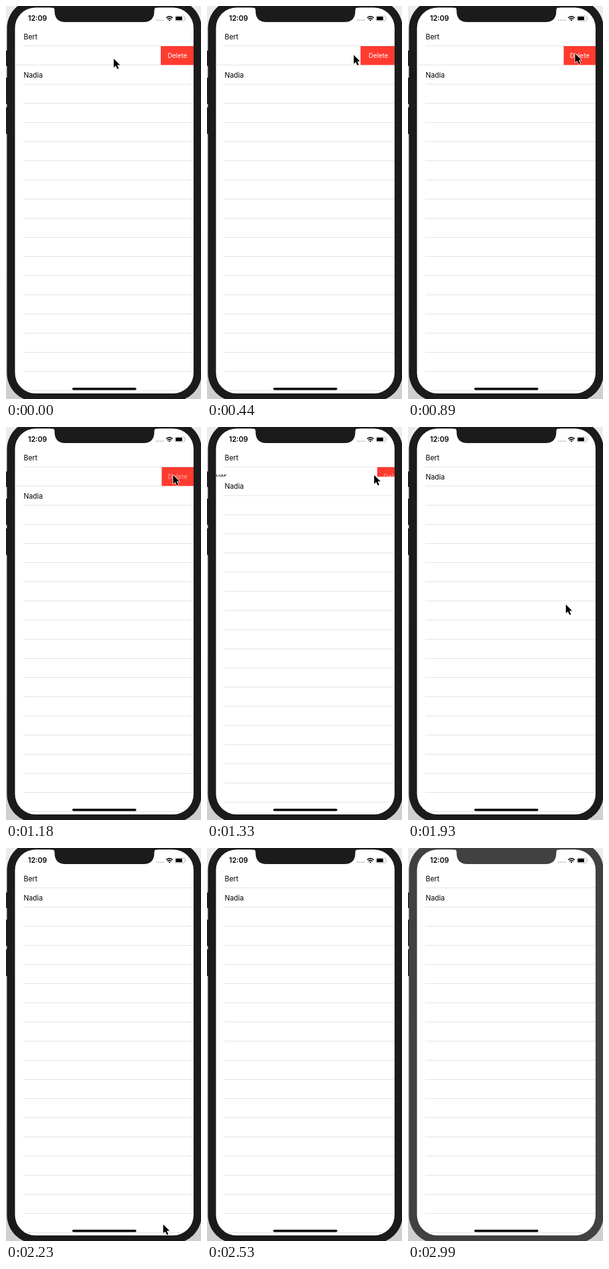
Recreate the animation shown at these times as an HTML page. Size 315 by 636 pixels, loop 3.09 s.

```html
<!DOCTYPE html>
<html lang="en">
<head>
<meta charset="utf-8">
<title>Swipe to delete</title>
<style>
  html, body { margin: 0; width: 100%; height: 100%; overflow: hidden; background: #e6e6e6; }
  svg { display: block; width: 100%; height: 100%; }
  text { font-family: Inter, Roboto, Arial, sans-serif; font-size: 11.3px; fill: #000; }
</style>
</head>
<body>
<svg viewBox="0 0 315 636">
  <defs>
    <linearGradient id="wall" x1="0" y1="0" x2="0" y2="1">
      <stop offset="0" stop-color="#ececec"/>
      <stop offset="1" stop-color="#cfcfcf"/>
    </linearGradient>
    <clipPath id="screen"><rect x="14.5" y="2.5" width="288.5" height="624.5" rx="33"/></clipPath>
    <clipPath id="rowClip"><rect id="rowBox" x="14" y="65" width="290" height="31"/></clipPath>
  </defs>

  <rect width="315" height="636" fill="url(#wall)"/>
  <g fill="#202020">
    <rect x="0" y="72" width="3" height="25"/>
    <rect x="0" y="116" width="3" height="42.5"/>
    <rect x="0" y="164" width="3" height="43"/>
  </g>
  <rect class="bezel" x="1.5" y="-10" width="314.5" height="650" rx="46"/>

  <g clip-path="url(#screen)">
    <rect x="14" y="2" width="290" height="626" fill="#fff"/>
    <text x="28.5" y="53.6">Bert</text>
    <rect x="28" y="64" width="275" height="1" fill="#e2e2e2"/>
    <g id="row" clip-path="url(#rowClip)">
      <g id="cell">
        <text x="28.5" y="84.4">Oliver</text>
        <rect x="28" y="95" width="275" height="1" fill="#e2e2e2"/>
      </g>
      <rect id="action" y="64.5" width="70" height="31" fill="#ff3b30"/>
      <text id="label" y="84" style="font-size:10.4px;fill:#fff">Delete</text>
    </g>
    <g id="rest">
      <text x="28.5" y="115.6">Nadia</text>
      <g id="lines" fill="#e2e2e2"></g>
    </g>
  </g>

  <path class="bezel" d="M72 0V2.5H74.5Q78.5 2.5 78.5 7V9Q79 26 96 26H222Q239 26 239.500 9V7Q239.500 2.500 243.500 2.500H246V0Z"/>

  <text x="35.600" y="24.200" style="font-size:11.500px;font-weight:600">12:09</text>
  <g fill="#c4c4c4">
    <circle cx="243.300" cy="23" r="1.200"/><circle cx="246.800" cy="23" r="1.200"/>
    <circle cx="250.300" cy="23" r="1.200"/><circle cx="253.800" cy="23" r="1.200"/>
  </g>
  <g fill="none" stroke="#000" stroke-width="1.700">
    <path d="M258.700 19.200Q264 14.400 269.300 19.200"/>
    <path d="M260.700 21.400Q264 18.500 267.300 21.400"/>
  </g>
  <path d="M262.300 22.700Q264 21.400 265.700 22.700L264 24.500Z"/>
  <rect x="273" y="16.200" width="16" height="8" rx="2.200" fill="none" stroke="#a5a5a5" stroke-width=".8"/>
  <rect x="274.200" y="17.300" width="10.400" height="5.800" rx="1.200"/>
  <path d="M290 18.700Q291.300 20.200 290 21.700Z" fill="#a5a5a5"/>

  <rect x="107" y="617.800" width="103.500" height="3.600" rx="1.800"/>

  <g id="cursor" stroke-linejoin="round">
    <path d="M1.500 2V16.500L4.700 13.500L7.300 19L10 17.800L7.500 12.500H12Z" opacity=".2"/>
    <path d="M1 1.200V15.500L4.300 12.400L6.800 18L9.200 16.900L6.800 11.500H11.200Z"
      stroke="#fff" stroke-width="1.500" paint-order="stroke"/>
  </g>
</svg>
<script>
const LOOP = 3090, REST = 251;
const $ = id => document.getElementById(id);

// Held poses: [start ms, value]
const pointer = [
  [0, [173, 84]], [140, [166, 90.5]], [440, [236, 78]], [590, [274, 77]],
  [740, [273.5, 77]], [890, [269, 76]], [1040, [269, 76.5]], [1930, [254, 286]],
  [2080, [253, 602]], [2230, [253, 608]], [2380, [260, 620]], [2530, null]
];
const edge = [
  [0, 250], [140, 243], [290, 238], [440, 248], [590, 250],
  [740, 251], [890, 251.5], [1330, 275], [1480, 303]
];
const rowHeight = [[0, 31], [1330, 15.5], [1480, 0]];
const labelAlpha = [[0, 1], [1180, 0.55]];
const bezelColor = [[0, '#1b1b1b'], [2990, '#414141']];

const at = (steps, t) => steps.filter(s => s[0] <= t).pop()[1];

function set(el, attrs) {
  for (const k in attrs) el.setAttribute(k, attrs[k]);
}

for (let y = 126; y < 660; y += 31) {
  const line = document.createElementNS('http://www.w3.org/2000/svg', 'rect');
  set(line, { x: 28, y, width: 275, height: 1 });
  $('lines').append(line);
}

const bezels = document.querySelectorAll('.bezel');

function draw(t) {
  const x = at(edge, t), h = at(rowHeight, t), p = at(pointer, t);
  set($('rowBox'), { height: h });
  set($('row'), { display: h ? 'inline' : 'none' });
  set($('cell'), { transform: `translate(${x - 303} 0)` });
  set($('action'), { x });
  set($('label'), { x: Math.max(x, REST) + 10, opacity: at(labelAlpha, t) });
  // Once the row is gone its upper neighbour keeps its own separator
  set($('rest'), { transform: `translate(0 ${h - 31})` });
  set($('cursor'), p ? { display: 'inline', transform: `translate(${p})` } : { display: 'none' });
  bezels.forEach(b => set(b, { fill: at(bezelColor, t) }));
}

const start = performance.now();
function tick() {
  draw((performance.now() - start) % LOOP);
  requestAnimationFrame(tick);
}
tick();
</script>
</body>
</html>
```
